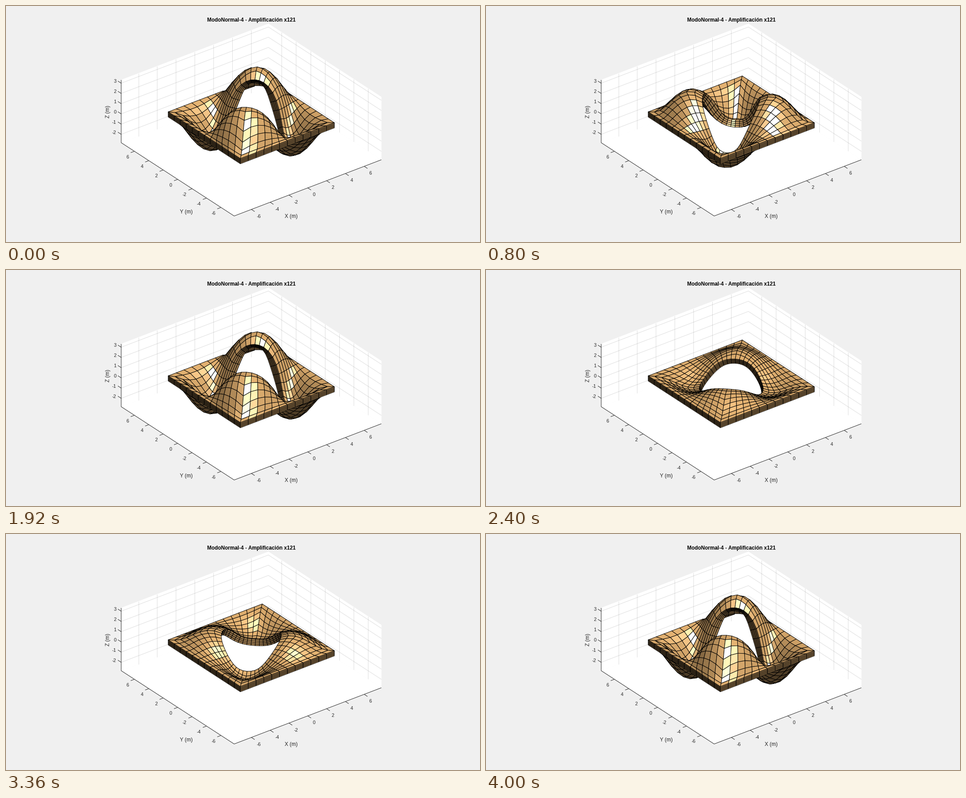
Animation, 1058 px wide and 529 px high, one loop 4080 ms. Source, as a matplotlib script:

```python
import numpy as np
import matplotlib.pyplot as plt
from matplotlib.animation import FuncAnimation
from matplotlib.collections import LineCollection, PolyCollection

W, H = 1058, 529
FRAMES, PERIOD, INTERVAL = 51, 25, 80
PT = 0.72                                   # points per pixel at 100 dpi

# Orthographic camera and box limits
AZ, EL = np.radians(-37.5), np.radians(30)
SCALE, CX, CY = 26.45, 547.5, 255.2
LIM, ZMIN, ZMAX = 7.83, -2.82, 3.32
ZMID = (ZMIN + ZMAX) / 2

# Square plate with a round hole
HALF, HOLE, THICK = 5, 2.63, 0.5
N_SIDE, N_RAD, N_LAYER = 12, 8, 4
AMP, POWER, FLAT, TILT = 2.76, 1.85, 0.22, 0.8

COPPER = np.array([1, 0.7812, 0.4975])
INK = (0.15, 0.15, 0.15)


def direction(az, el):
    """Unit vector towards a viewer at the given azimuth and elevation."""
    return np.array([np.sin(az) * np.cos(el), -np.cos(az) * np.cos(el), np.sin(el)])


VIEW = direction(AZ, EL)
LIGHT = direction(AZ + np.radians(30), EL + np.radians(30))


def project(p):
    p = np.asarray(p, float)
    x, y, z = p[..., 0], p[..., 1], p[..., 2] - ZMID
    right = np.cos(AZ) * x + np.sin(AZ) * y
    up = np.sin(EL) * (np.cos(AZ) * y - np.sin(AZ) * x) + np.cos(EL) * z
    return np.stack([CX + SCALE * right, CY - SCALE * up], axis=-1)


# ---- mesh and mode shape ----
def build_nodes():
    """Nodes indexed by [around, outward, layer]."""
    t = np.linspace(0, 4, 4 * N_SIDE + 1)
    angle = (t - 0.5) * np.pi / 2
    inner = HOLE * np.stack([np.cos(angle), np.sin(angle)], axis=-1)
    corners = np.arange(5)
    outer = HALF * np.stack([np.interp(t, corners, [1, 1, -1, -1, 1]),
                             np.interp(t, corners, [-1, 1, 1, -1, -1])], axis=-1)
    f = np.linspace(0, 1, N_RAD + 1)[None, :, None]
    xy = inner[:, None] * (1 - f) + outer[:, None] * f
    z = np.linspace(0, THICK, N_LAYER + 1)
    nodes = np.empty(xy.shape[:2] + (z.size, 3))
    nodes[..., :2] = xy[:, :, None]
    nodes[..., 2] = z
    return nodes


def deflection(x, y):
    """Four clamped lobes, flattened around the free rim of the hole."""
    clamp = (np.clip(1 - (x / HALF) ** 2, 0, None)
             * np.clip(1 - (y / HALF) ** 2, 0, None)) ** POWER
    r2 = x ** 2 + y ** 2
    return x * y * clamp * (1 - FLAT * HOLE ** 2 / r2 * (2 * x * y / r2) ** 2)


def mode_shape(nodes, eps=1e-4):
    x, y, z = np.moveaxis(nodes, -1, 0)
    w = deflection(x, y)
    wx = (deflection(x + eps, y) - deflection(x - eps, y)) / (2 * eps)
    wy = (deflection(x, y + eps) - deflection(x, y - eps)) / (2 * eps)
    arm = -TILT * (z - THICK / 2)
    return AMP / w.max() * np.stack([arm * wx, arm * wy, w], axis=-1)


def quads(g):
    return np.stack([g[:-1, :-1], g[1:, :-1], g[1:, 1:], g[:-1, 1:]],
                    axis=2).reshape(-1, 4, 3)


def skin(n):
    """Outward facing quads of the whole surface."""
    return np.concatenate([
        quads(n[:, :, -1].swapaxes(0, 1)),
        quads(n[:, :, 0]),
        quads(n[:, -1]),
        quads(n[:, 0].swapaxes(0, 1)),
    ])


def shade(normal):
    facing = normal @ LIGHT
    mirror = 2 * facing[:, None] * normal - LIGHT
    lit = np.clip(facing, 0, None)
    gloss = np.where(facing > 0, np.clip(mirror @ VIEW, 0, None) ** 10, 0)
    rgb = COPPER * (0.3 + 0.6 * lit)[:, None] + 0.9 * gloss[:, None]
    return np.clip(rgb, 0, 1)


NODES = build_nodes()
MODE = mode_shape(NODES)

# ---- stage ----
fig = plt.figure(figsize=(W / 100, H / 100), dpi=100, facecolor="#f0f0f0")
ax = fig.add_axes([0, 0, 1, 1])
ax.set_xlim(0, W)
ax.set_ylim(H, 0)
ax.axis("off")


def label(x, y, s, size=10.67, **kw):
    style = dict(ha="center", va="center_baseline", color=INK,
                 family="Liberation Sans")
    ax.text(x, y, s, fontsize=size * PT, **{**style, **kw})


def lines(segments, color, width, z):
    ax.add_collection(LineCollection([project(s) for s in segments], colors=[color],
                                     linewidths=width * PT, zorder=z))


def draw_box():
    a, lo, hi = LIM, ZMIN, ZMAX
    planes = [
        [(-a, -a, lo), (a, -a, lo), (a, a, lo), (-a, a, lo)],
        [(-a, a, lo), (a, a, lo), (a, a, hi), (-a, a, hi)],
        [(a, -a, lo), (a, a, lo), (a, a, hi), (a, -a, hi)],
    ]
    ax.add_collection(PolyCollection([project(p) for p in planes], facecolors="white",
                                     edgecolors="white", linewidths=0.5, zorder=0))

    grid = []
    for v in range(-6, 7, 2):
        grid.append([(v, a, lo), (v, a, hi)])
        grid.append([(a, v, lo), (a, v, hi)])
    for v in range(-2, 4):
        grid.append([(-a, a, v), (a, a, v), (a, -a, v)])
    lines(grid, INK + (0.15,), 1, 1)

    tick_y = 8.8 / np.hypot(*(project((0, 1, 0)) - project((0, 0, 0))))
    tick_x = 8.8 / np.hypot(*(project((1, 0, 0)) - project((0, 0, 0))))
    frame = [[(-a, a, hi), (-a, a, lo), (-a, -a, lo), (a, -a, lo)]]
    for v in range(-6, 7, 2):
        end = (v, -a - tick_y, lo)
        frame.append([(v, -a, lo), end])
        x, y = project(end)
        label(x + 4, y + 10, str(v), ha="left")
        end = (-a - tick_x, v, lo)
        frame.append([(-a, v, lo), end])
        x, y = project(end)
        label(x - 4, y + 9.5, str(v), ha="right")
    for v in range(-2, 4):
        end = (-a, a + tick_y, v)
        frame.append([(-a, a, v), end])
        x, y = project(end)
        label(x - 3.4, y - 0.3, str(v), ha="right")
    lines(frame, INK, 1, 2)


draw_box()
label(637, 470, "X (m)", 11.73)
label(402, 461, "Y (m)", 11.73)
label(227.5, 236.5, "Z (m)", 11.73, rotation=90, va="center")
label(547.5, 30.5, "ModoNormal-4 - Amplificación x121", 11.62,
      color="black", weight="bold")

plate = PolyCollection([], edgecolors="black", linewidths=PT,
                       joinstyle="round", zorder=3)
ax.add_collection(plate)


def update(i):
    faces = skin(NODES + MODE * np.cos(2 * np.pi * i / PERIOD))
    normal = np.cross(faces[:, 2] - faces[:, 0], faces[:, 3] - faces[:, 1])
    normal /= np.linalg.norm(normal, axis=1, keepdims=True)
    seen = normal @ VIEW > 0
    faces, normal = faces[seen], normal[seen]
    order = np.argsort(faces.mean(axis=1) @ VIEW)
    plate.set_verts(project(faces[order]))
    plate.set_facecolor(shade(normal[order]))
    return (plate,)


anim = FuncAnimation(fig, update, frames=FRAMES, interval=INTERVAL,
                     init_func=lambda: update(0), repeat=True, repeat_delay=0)
plt.show()
```
